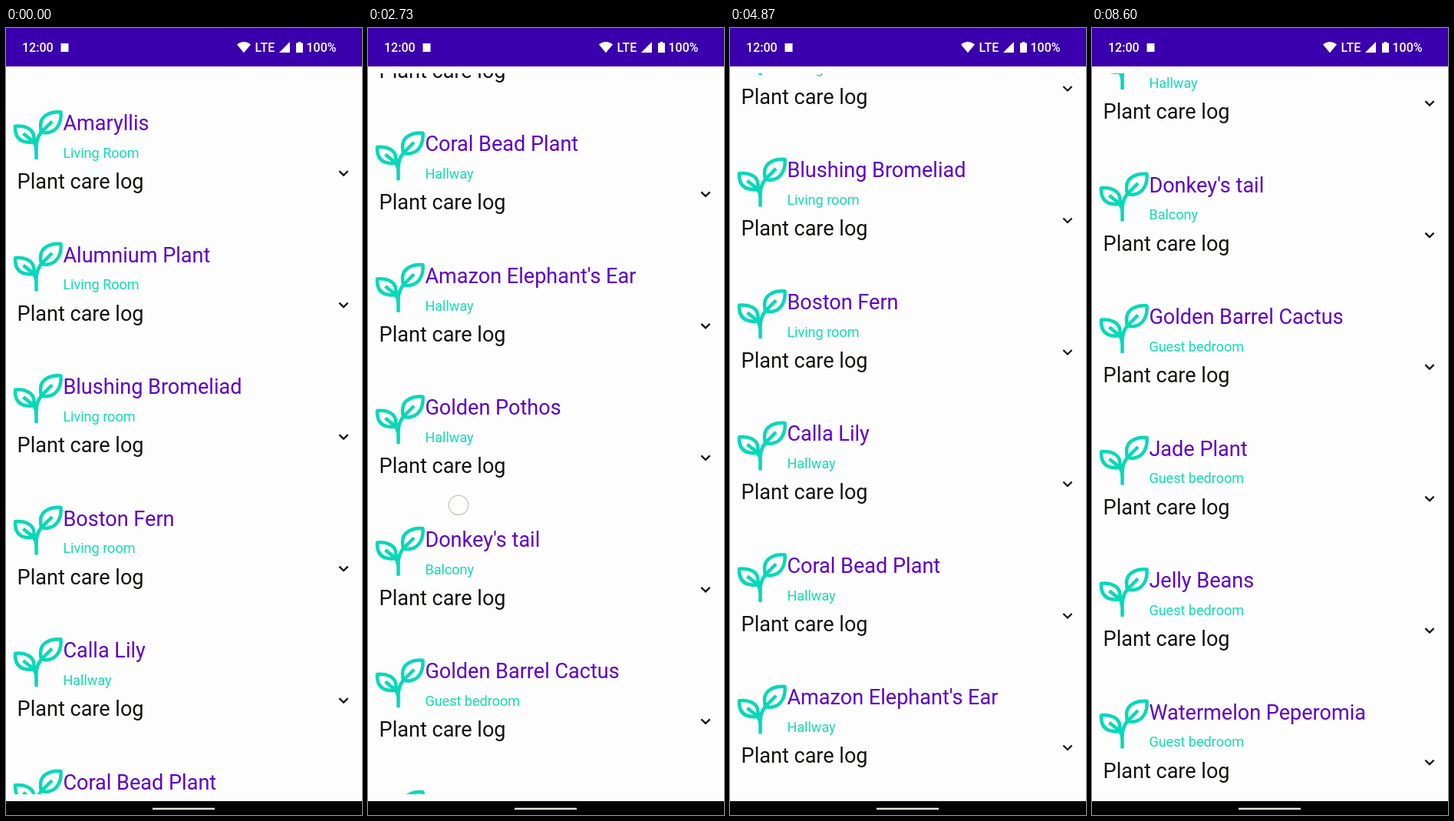
Recreate the animation shown at these times as an HTML page with a canvas. Size 464x1024 px, loop 8.7 s.

```html
<!DOCTYPE html>
<html lang="en">
<head>
<meta charset="utf-8">
<title>Plant list</title>
<style>
  html, body { margin: 0; width: 100%; height: 100%; overflow: hidden; background: #fdfdfd; }
  canvas { display: block; width: 464px; height: 1024px; }
</style>
</head>
<body>
<canvas id="stage"></canvas>
<script>
const W = 464, H = 1024, LOOP = 8700, FPS = 15;
const LIST_TOP = 59, LIST_BOTTOM = 997, PITCH = 171.5;
const MAX_SCROLL = 1291.5;
const COLORS = {
  paper: '#fdfdfd', bar: '#3a00ad', title: '#5d00c8',
  leaf: '#06d8b8', room: '#12dcb4', ink: '#121210', handle: '#e8e8e0'
};

const plants = [
  ['Amaryllis', 'Living Room'],
  ['Alumnium Plant', 'Living Room'],
  ['Blushing Bromeliad', 'Living room'],
  ['Boston Fern', 'Living room'],
  ['Calla Lily', 'Hallway'],
  ['Coral Bead Plant', 'Hallway'],
  ["Amazon Elephant's Ear", 'Hallway'],
  ['Golden Pothos', 'Hallway'],
  ["Donkey's tail", 'Balcony'],
  ['Golden Barrel Cactus', 'Guest bedroom'],
  ['Jade Plant', 'Guest bedroom'],
  ['Jelly Beans', 'Guest bedroom'],
  ['Watermelon Peperomia', 'Guest bedroom']
];

// Scroll position over time: [ms, px]
const scrollKeys = [
  [0, 0], [960, 0], [1300, 50], [1533, 191], [1750, 345], [2100, 500],
  [2450, 610], [2733, 830], [2950, 985], [3300, 1120], [3533, 1251],
  [3660, MAX_SCROLL], [4430, MAX_SCROLL], [4560, 1130], [4700, 700],
  [4867, 281], [5050, 60], [5220, 0], [6070, 0], [6250, 200], [6480, 600],
  [6700, 880], [6933, 1074.5], [7200, 1215], [7530, MAX_SCROLL], [LOOP, MAX_SCROLL]
];

// The finger travels with the content while it drags
const touches = [
  { from: 1200, to: 1690, x: 84, y: 635, scroll: 191 },
  { from: 2460, to: 2810, x: 118, y: 621, scroll: 830 },
  { from: 3320, to: 3610, x: 150, y: 677, scroll: 1251 }
];

const canvas = document.getElementById('stage');
const ctx = canvas.getContext('2d');
const ratio = window.devicePixelRatio || 1;
canvas.width = W * ratio;
canvas.height = H * ratio;

const secant = i => {
  const a = scrollKeys[i], b = scrollKeys[i + 1];
  return a && b ? (b[1] - a[1]) / (b[0] - a[0]) : 0;
};

// Harmonic mean keeps the curve free of overshoot
function slopeAt(i) {
  const before = secant(i - 1), after = secant(i);
  return before * after > 0 ? 2 * before * after / (before + after) : 0;
}

function scrollAt(t) {
  let i = 0;
  while (i < scrollKeys.length - 2 && t >= scrollKeys[i + 1][0]) i++;
  const [t0, s0] = scrollKeys[i], [t1, s1] = scrollKeys[i + 1];
  const d = t1 - t0, u = (t - t0) / d, v = 1 - u;
  return s0 * (1 + 2 * u) * v * v + slopeAt(i) * d * u * v * v +
         s1 * u * u * (3 - 2 * u) - slopeAt(i + 1) * d * u * u * v;
}

function text(string, x, y, size, color, weight = 400) {
  ctx.font = `${weight} ${size}px Roboto, sans-serif`;
  ctx.fillStyle = color;
  ctx.fillText(string, x, y);
}

function stroke(path, color, width) {
  ctx.strokeStyle = color;
  ctx.lineWidth = width;
  ctx.stroke(path);
}

const sprout = new Path2D(
  'M39.5 171V155C39.5 146 41.5 141 46 135.5L60 121.5' +
  'M71.5 109.5C59 108.5 45.5 113 45 126C45 130 45.5 133 46 135.5' +
  'C49 136.2 52 136.5 55 136C68 134 72.5 121 71.5 109.5Z' +
  'M12 127.8C24 126.3 36 130.8 36.5 142C36.5 145 36.5 146.5 36 148.3' +
  'C33 148.9 31 148.8 28 148.5C16 147.3 11.5 139.3 12 127.8Z' +
  'M22.5 137.3L34 146.5C37.5 149.5 39.5 153.5 39.5 160');
const chevron = new Path2D('M434.4 186.1L440 191.6L445.6 186.1');
const wifi = new Path2D('M301 21.6C306 16.9 314 16.9 319 21.6L310 32.3Z');
const signal = new Path2D('M370 18V32H356Z');
const battery = new Path2D('M380.7 18H384.3V19.6H387V32H378V19.6H380.7Z');

function drawPlant([name, room], y) {
  ctx.save();
  ctx.translate(0, y);
  ctx.lineJoin = 'round';
  stroke(sprout, COLORS.leaf, 4.5);
  text(name, 74.4, 133, 27.07, COLORS.title);
  text(room, 74.4, 168.8, 18.05, COLORS.room);
  text('Plant care log', 14.6, 209, 27.07, COLORS.ink);
  ctx.lineJoin = 'miter';
  stroke(chevron, COLORS.ink, 2.2);
  ctx.restore();
}

function drawList(scroll) {
  ctx.save();
  ctx.beginPath();
  ctx.rect(0, LIST_TOP, W, LIST_BOTTOM - LIST_TOP);
  ctx.clip();
  plants.forEach((plant, i) => {
    const y = i * PITCH - scroll;
    if (y > -PITCH && y < LIST_BOTTOM) drawPlant(plant, y);
  });
  ctx.restore();
}

function drawBars() {
  ctx.fillStyle = COLORS.bar;
  ctx.fillRect(0, 0, W, 50);
  text('12:00', 21, 31, 16, '#fff', 500);
  text('LTE', 324.5, 31, 16, '#fff', 500);
  text('100%', 391.5, 31, 16, '#fff', 500);
  ctx.fillRect(71.5, 20, 10, 11);
  [wifi, signal, battery].forEach(shape => ctx.fill(shape));

  ctx.fillStyle = '#000';
  ctx.fillRect(0, 1006, W, 18);
  ctx.fillStyle = COLORS.handle;
  ctx.fillRect(191, 1014.7, 81, 2.4);
}

function drawTouch(t, scroll) {
  const touch = touches.find(({ from, to }) => t >= from && t < to);
  if (!touch) return;
  ctx.beginPath();
  ctx.arc(touch.x, touch.y + touch.scroll - scroll, 12.7, 0, Math.PI * 2);
  ctx.fillStyle = 'rgba(255,255,255,0.25)';
  ctx.fill();
  ctx.strokeStyle = 'rgba(160,160,140,0.6)';
  ctx.lineWidth = 1.2;
  ctx.stroke();
}

function draw(now) {
  const tick = Math.floor((now % LOOP + 5) * FPS / 1000);
  const t = tick * 1000 / FPS;
  const scroll = scrollAt(t);
  ctx.setTransform(ratio, 0, 0, ratio, 0, 0);
  ctx.fillStyle = COLORS.paper;
  ctx.fillRect(0, 0, W, H);
  drawList(scroll);
  drawBars();
  drawTouch(t, scroll);
}

let start;
function loop(now) {
  start ??= now;
  draw(now - start);
  requestAnimationFrame(loop);
}
draw(0);
requestAnimationFrame(loop);
</script>
</body>
</html>
```
